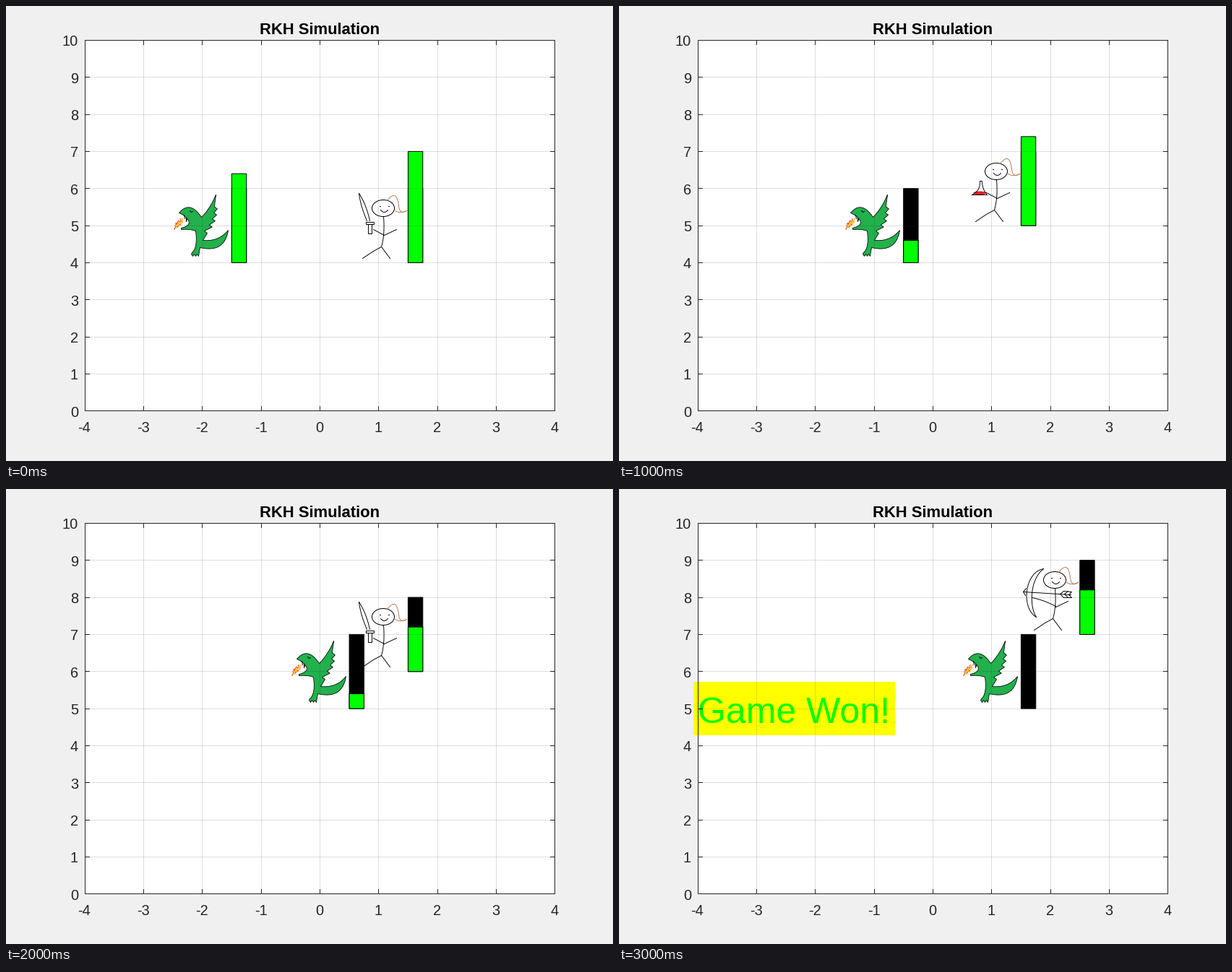
Recreate the animation shown at these times as a matplotlib script. Size 840 by 630 pixels, loop 3.5 s.

```python
import math
import random

import matplotlib.pyplot as plt
import numpy as np
from matplotlib.animation import FuncAnimation
from matplotlib.patches import Ellipse, Polygon, Rectangle

W, H, DPI = 840, 630, 100
PT = 72 / DPI  # one pixel in points
DARK = "#262626"
LIME = "#00ff00"
RED = "#ed1c24"
BROWN = "#b97a57"

# Moves between turns: left, right, up; a dash stays put.
STEP = {"L": (-1, 0), "R": (1, 0), "U": (0, 1), "-": (0, 0)}
DRAGON_MOVES = "- R R U R -".split()
HERO_MOVES = "L RU R LU R U".split()
DRAGON_HEALTH = [2.4, 1.2, 0.6, 0.6, 0.4, 0.4, 0]
HERO_HEALTH = [3, 3, 2.4, 1.2, 1.2, 1.2, 1.2]
WEAPONS = "sword bow potion bow sword bow bow".split()

plt.rcParams["font.family"] = "Liberation Sans"
fig = plt.figure(figsize=(W / DPI, H / DPI), dpi=DPI, facecolor="#f0f0f0")
ax = fig.add_axes([0, 0, 1, 1])
ax.set(xlim=(0, W), ylim=(H, 0))
ax.axis("off")
live = []


def px(x):
    return 109 + 81.35 * (x + 4)


def py(y):
    return 560.8 - 51.345 * y


def walk(start, moves):
    steps = [np.sum([STEP[m] for m in move], axis=0) for move in moves]
    return np.cumsum([start, *steps], axis=0)


def curve(*ctrl, n=16):
    """Bezier curve through the first and last control point."""
    t = np.linspace(0, 1, n)[:, None]
    k = len(ctrl) - 1
    return sum(math.comb(k, i) * t**i * (1 - t)**(k - i) * np.array(p)
               for i, p in enumerate(ctrl))


def box(x, y, w, h):
    return [(x, y), (x + w, y), (x + w, y + h), (x, y + h), (x, y)]


# --- chart ---

def label(x, y, s, size, color=DARK, ha="center", **kw):
    return ax.text(x, y, s, fontsize=size * PT, color=color, ha=ha,
                   va="baseline", **kw)


def rule(xs, ys, **kw):
    ax.plot(np.array(xs) + 0.5, np.array(ys) + 0.5, lw=PT, color=DARK,
            solid_capstyle="projecting", snap=False, **kw)


def draw_chart():
    left, right = math.floor(px(-4)), math.floor(px(4))
    top, bottom = math.floor(py(10)), math.floor(py(0))
    ax.add_patch(Rectangle((left, top), right - left, bottom - top,
                           fc="white", ec="none", zorder=0))
    for v in range(-4, 5):
        x = math.floor(px(v))
        if -4 < v < 4:
            rule([x, x], [top, bottom], alpha=0.15, zorder=6)
        rule([x, x], [bottom, bottom - 6], zorder=7)
        rule([x, x], [top, top + 6], zorder=7)
        label(px(v) - 0.5, 590, str(v), 20)
    for v in range(11):
        y = math.floor(py(v))
        if 0 < v < 10:
            rule([left, right], [y, y], alpha=0.15, zorder=6)
        rule([left, left + 6], [y, y], zorder=7)
        rule([right, right - 6], [y, y], zorder=7)
        label(100, py(v) + 8, str(v), 20, ha="right")
    rule([left, right, right, left, left], [top, top, bottom, bottom, top],
         zorder=7)
    label(434.5, 39, "RKH Simulation", 22, "black", weight="bold")


# --- sprites, in pixels from their top left corner ---

def add(patch):
    live.append(ax.add_patch(patch))


def stroke(pts, at, color="black"):
    x, y = (np.array(pts) + at + 0.5).T
    live.extend(ax.plot(x, y, color=color, lw=0.95 * PT, zorder=2))


def oval(center, w, h, at, **kw):
    add(Ellipse(np.array(center) + at + 0.5, w, h, lw=PT, zorder=2, **kw))


def sprite_origin(x, y, dx):
    return np.array([math.floor(px(x)) - dx, math.floor(py(y)) - 97])


def wing_edge(feathers=5):
    """Trailing edge of the wing: a notch before each feather tip."""
    pts = []
    for t in np.linspace(0.2, 1, feathers):
        tip = np.array([62 - 14 * t**3, 14 + 42 * t])
        pts += [tip - (4, 3), tip]
    return pts


def dragon_outline():
    claws = [(36 - 2 * i, 88 - 3 * (i % 2)) for i in range(6)]
    return np.vstack([
        curve((9, 28), (24, 10), (40, 34)),    # head
        curve((40, 34), (52, 22), (60, 3)),    # wing
        wing_edge(),
        curve((42, 66), (64, 68), (77, 52)),   # tail
        curve((77, 52), (72, 84), (38, 76)),
        claws,
        curve((27, 83), (35, 76), (32, 53)),   # leg and chest
        curve((32, 53), (24, 50), (12, 51)),   # jaw
        curve((12, 49), (32, 44), (15, 31))])


def draw_flames(at):
    rng = random.Random(4)
    for color in (RED, RED, "#ff7f27", "#fff200", "#ffc90e"):
        y0 = rng.uniform(34, 42)
        stroke([(13 - 1.8 * i + rng.uniform(-2, 2),
                 y0 + 1.5 * i + 3 * (i % 2)) for i in range(6)], at, color)


def draw_dragon(x, y):
    at = sprite_origin(x, y, 82)
    add(Polygon(dragon_outline() + at + 0.5, fc="#22b14c", ec="black",
                lw=0.8 * PT, zorder=2))
    for i in range(3):  # teeth
        stroke([(16 + 2 * i, 31 + 3 * i), (17 + i, 36 + 2 * i)], at)
    stroke([(24, 25), (26, 27), (28, 26)], at)
    draw_flames(at)


def draw_sword(at):
    for bend in ((6, 18), (14, 16)):
        stroke(curve((4, 1), bend, (bend[0] / 2 + 12, 39)), at)
    stroke(box(13, 40, 11, 3), at)
    stroke(box(16, 43, 5, 13), at)
    stroke([(24, 51), (39, 59)], at)


def draw_bow(at):
    for a, b in (((-4, 10), (-10, 60)), ((3, 20), (2, 58))):
        stroke(curve((22, 6), a, b, (12, 73)), at)
    stroke([(-6, 38), (60, 42)], at)
    stroke([(-2, 33), (-6, 38), (-3, 43)], at)
    for dx in (0, 6):
        stroke([(50 + dx, 37), (45 + dx, 41), (50 + dx, 46)], at)
    stroke([(50, 37), (61, 38), (57, 42), (61, 46), (50, 46)], at)
    stroke(curve((6, 46), (22, 49), (39, 58)), at)


def draw_potion(at):
    oval((14.5, 51.5), 17, 5, at, fc=RED, ec="none")
    stroke(np.vstack([curve((4, 54), (16, 48), (15, 35)),
                      curve((18, 35), (18, 46), (25, 54)), [(4, 54)]]), at)
    stroke([(24, 51), (39, 59)], at)


def draw_hero(x, y, weapon):
    at = sprite_origin(x, y, 72)
    oval((37.5, 21.5), 31, 23, at, fc="none", ec="black")
    for eye in (32, 44):
        stroke([(eye, 18), (eye + 1, 18)], at)
    stroke(curve((34, 24), (39, 30), (44, 24)), at)
    stroke(curve((38, 33), (40, 58), (35, 75)), at)
    stroke([(9, 91), (24, 81), (35, 75), (47, 91)], at)
    stroke([(39, 59), (56, 51)], at)
    for hair in (((43, 11), (56, -6), (59, 18)), ((59, 18), (60, 31), (70, 25)),
                 ((53, 24), (60, 30), (70, 25))):
        stroke(curve(*hair), at, BROWN)
    {"sword": draw_sword, "bow": draw_bow, "potion": draw_potion}[weapon](at)


def draw_bar(x, y, health):
    for height, color in ((2, "black"), (health, LIME)):
        if height:
            add(Rectangle((px(x), py(y)), px(0.25) - px(0),
                          py(height) - py(0), fc=color, ec="black", lw=PT,
                          snap=False, zorder=3))


def draw_banner():
    add(Rectangle((103, 267), 279, 74, fc="#ffff00", ec="none", zorder=4))
    live.append(label(px(-4), 324, "Game Won!", 50, LIME, "left", zorder=5))


dragon_path = walk((-1.5, 4), DRAGON_MOVES)
hero_path = walk((1.5, 4), HERO_MOVES)


def update(turn):
    while live:
        live.pop().remove()
    draw_hero(*hero_path[turn], WEAPONS[turn])
    draw_dragon(*dragon_path[turn])
    draw_bar(*hero_path[turn], HERO_HEALTH[turn])
    draw_bar(*dragon_path[turn], DRAGON_HEALTH[turn])
    if DRAGON_HEALTH[turn] == 0:
        draw_banner()
    return live


draw_chart()
anim = FuncAnimation(fig, update, frames=len(WEAPONS), interval=500,
                     init_func=lambda: [], repeat=True, repeat_delay=0)
plt.show()
```
